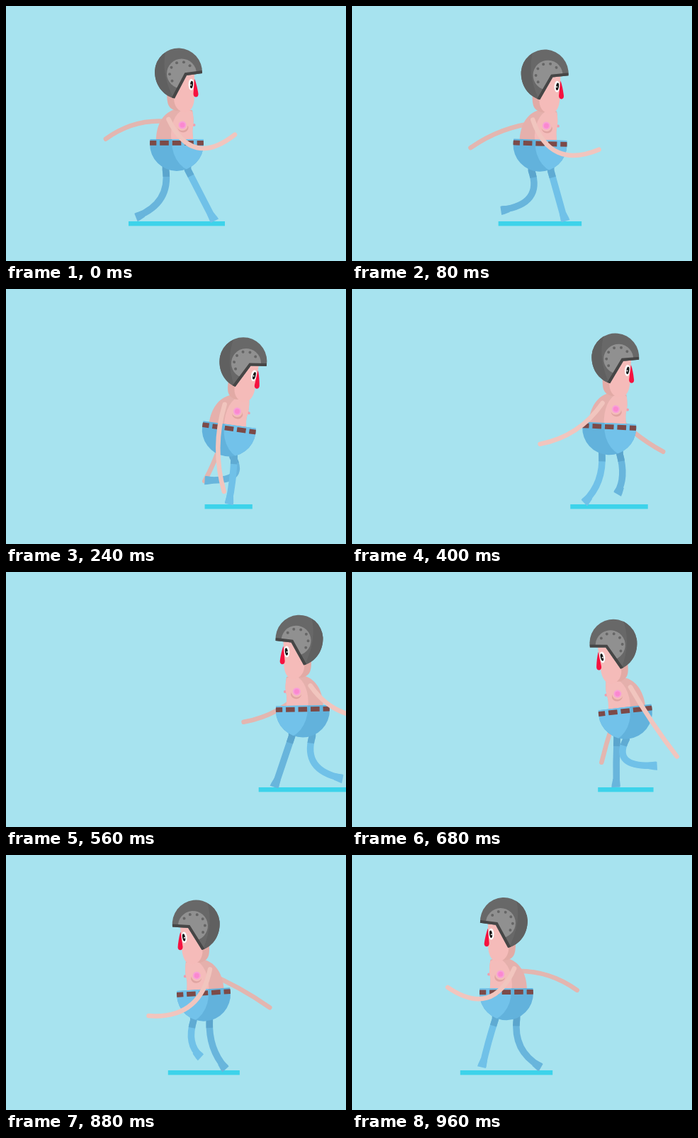
Recreate the animation shown at these times as an HTML page with a canvas. Size 480x360 px, loop 1000 ms.

```html
<!DOCTYPE html>
<html lang="en">
<head>
<meta charset="utf-8">
<title>Walking man in a helmet</title>
<style>
html, body { margin: 0; width: 100%; height: 100%; overflow: hidden; background: #a7e3ef; }
canvas { display: block; width: 480px; height: 360px; }
</style>
</head>
<body>
<canvas id="stage" width="480" height="360"></canvas>
<script>
const ctx = document.getElementById('stage').getContext('2d');
const LOOP = 1000, STEP = 40, TURN = 500;
const DEG = Math.PI / 180;
const wave = p => Math.cos(2 * Math.PI * p);

function bodyX(t) {
  if (t < TURN) return 241 + .305 * t;
  const d = t - 560;
  return 419 - .1725 * d - .000825 * d * d;
}

function fill(color, d) {
  ctx.fillStyle = color;
  ctx.fill(new Path2D(d));
}

function oval(color, x, y, rx, ry = rx, turn = 0) {
  ctx.fillStyle = color;
  ctx.beginPath();
  ctx.ellipse(x, y, rx, ry, turn, 0, 7);
  ctx.fill();
}

function clipped(d, draw) {
  ctx.save();
  ctx.clip(new Path2D(d));
  draw();
  ctx.restore();
}

// A curved limb hanging from the shoulder; bend pushes the elbow off the straight line
function arm(x, y, angle, length, bend, color) {
  const sin = Math.sin(angle * DEG), cos = Math.cos(angle * DEG);
  ctx.strokeStyle = color;
  ctx.lineWidth = 6.5;
  ctx.lineCap = 'round';
  ctx.beginPath();
  ctx.moveTo(x, y);
  ctx.quadraticCurveTo(
    x + sin * length / 2 - cos * bend, y + cos * length / 2 + sin * bend,
    x + sin * length, y + cos * length);
  ctx.stroke();
}

const armSwing = p => 72 * wave(p) + 5 * wave(2 * p);

// The foot slides back evenly, then swings forward faster and faster
function footAt(p) {
  const u = 2 * p % 1;
  if (p < .5) return [52 - 108 * u, 302 - 5 * u ** 4];
  return [-56 + 106 * u * u, 302 - 30 * Math.sin(Math.PI * u) ** 1.5 - 5 * (1 - u)];
}

function leg(phase, dip, color, shade) {
  const p = phase % 1;
  const [x, y] = footAt(p);
  const hx = 15.5 * wave(p) + 7 * dip, hy = 231 + 6 * dip;
  const bend = Math.sin(Math.PI * p ** 1.75) ** 2;
  const cx = (hx + x) / 2 + 42 * bend, cy = (hy + y) / 2 + 22 * bend;
  const path = new Path2D(`M${hx},${hy - 12}L${hx},${hy}Q${cx},${cy} ${x},${y}`);
  ctx.lineWidth = 9.5;
  ctx.lineCap = 'butt';
  ctx.lineJoin = 'round';
  ctx.strokeStyle = color;
  ctx.stroke(path);
  ctx.setLineDash([22, 999]);
  ctx.strokeStyle = shade;
  ctx.stroke(path);
  ctx.setLineDash([]);
  ctx.save();
  ctx.translate(x, y);
  ctx.rotate(Math.atan2(y - cy, x - cx));
  fill(color, 'M-10,4.7L0,5.5 2,5 2,-7 -2,-6.5 -10,-4.7Z');
  ctx.restore();
}

function torso() {
  const shape = 'M-29,194C-30,172 -22,152 -3,146L22,147C24,158 24,164 23,170C21,178 24,186 23,194Z';
  oval('#ee9fae', 24.5, 168, 2);
  fill('#e5b0ac', shape);
  clipped(shape, () => oval('#f4bcba', 13, 182, 21, 36));
  oval('#e0a4a1', 9, 172, 7.5, 6.5);
  oval('#f4bcba', 8, 169, 7.5, 7);
  oval('#f8a0d8', 8, 168, 5.5);
  oval('#fb88d0', 8, 168, 3.5);
}

function pants() {
  const bowl = 'M-37.5,188H37.5A38,38 0 0 1 38,195A38,38 0 0 1 -38,195A38,38 0 0 1 -37.5,188Z';
  fill('#62b2dc', bowl);
  clipped(bowl, () => {
    oval('#72c2ea', 30, 192, 37, 43);
    ctx.fillStyle = '#7c4a48';
    for (let i = -2; i <= 2; i++) ctx.fillRect(17.5 * i - 6.3, 190, 12.6, 6.8);
  });
}

function head() {
  fill('#e2aaa5', 'M-14,116C-14,138 -13,145 0,148L12,147 12,110Z');
  fill('#f5bbb9', 'M8,90L25,94 25,128C25,141 20,150 11,150C2,149 -4,141 -4,130Z');
  oval('#fff', 20.5, 111, 3.9, 8);
  oval('#181818', 21, 111, 2, 5.3, .1);
  oval('#fff', 20.2, 111.5, 1);
  fill('#f5123f', 'M25,103C26,104 29,114 30.5,124C31,130 23.5,130 23.5,124Z');

  const shell = 'M36,95A33.5,34 0 1 0 -31,92C-31,111 -20,126 -3,130.5L14,98Z';
  fill('#686868', shell);
  clipped(shell, () => {
    fill('#606060', 'M-40,50H-12C-22,80 -18,105 -2,135H-40Z');
    oval('#909090', 7, 95.5, 21);
    for (let i = 0; i < 6; i++) {
      const a = (142 + 35 * i) * DEG;
      oval('#666', 6.5 + 16.5 * Math.cos(a), 95.5 + 16.5 * Math.sin(a), 2);
    }
    ctx.strokeStyle = '#464646';
    ctx.lineWidth = 8;
    ctx.lineCap = 'butt';
    ctx.lineJoin = 'miter';
    ctx.stroke(new Path2D('M-5,134L14,98 38,94.7'));
  });
}

function draw(t) {
  const p = t / LOOP;
  const dip = Math.sin(2 * Math.PI * p) ** 2; // 0 in full stride, 1 as the legs pass
  const x = bodyX(t), width = 136 - 69 * dip ** .9;

  ctx.fillStyle = '#a7e3ef';
  ctx.fillRect(0, 0, 480, 360);
  ctx.fillStyle = '#3dd3ea';
  ctx.fillRect(x - width / 2, 304, width, 6.5);

  ctx.save();
  ctx.translate(x, 0);
  if (t >= TURN) ctx.scale(-1, 1);

  arm(-5 + 6 * dip, 164 + 3 * dip, armSwing(p + .5) - 9, 98 + 12 * dip,
    5 + 15 * wave(2 * p), '#e3b6b0');
  leg(p + .5, dip, '#68b5dc', '#5ba5cd');
  leg(p, dip, '#70c1e8', '#5fabd3');

  ctx.save();
  ctx.translate(dip, 192 + 3.5 * dip);
  ctx.rotate(8 * dip * DEG);
  ctx.translate(0, -192);
  torso();
  pants();
  ctx.restore();

  ctx.save();
  ctx.translate(2 + 18.5 * dip, 92 + 8.7 * dip);
  ctx.rotate(9 * dip * DEG);
  ctx.translate(-2, -92);
  head();
  ctx.restore();

  arm(-11.5 + 6 * dip, 160 + 3 * dip, armSwing(p), 96 + 27 * dip,
    15 + 45 * wave(p), '#f1c5be');
  ctx.restore();
}

function tick() {
  draw(Math.floor(performance.now() % LOOP / STEP) * STEP);
  requestAnimationFrame(tick);
}
tick();
</script>
</body>
</html>
```
